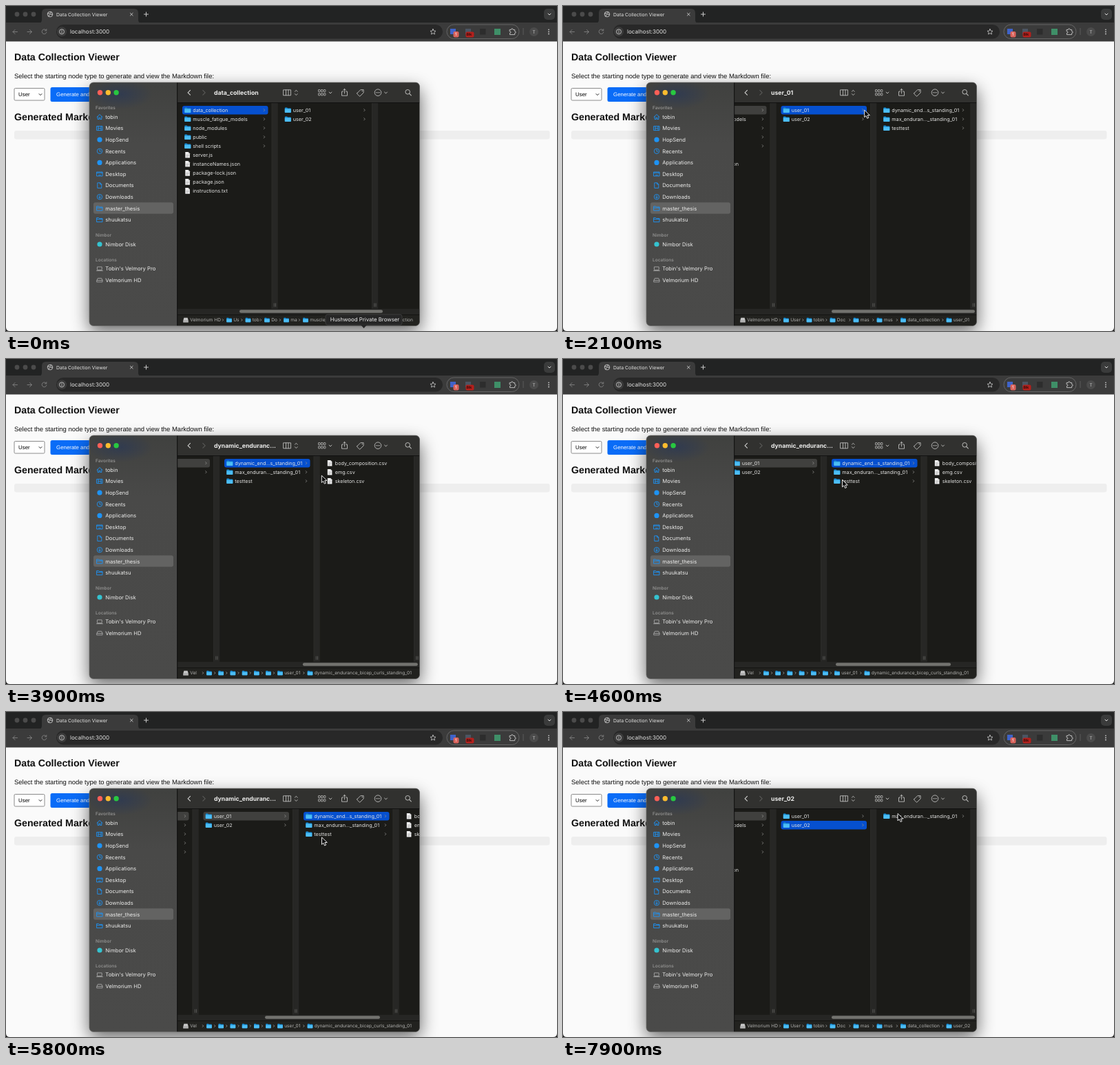
Recreate the animation shown at these times as an HTML page. Size 800 by 472 pixels, loop 8000 ms.

```html
<!DOCTYPE html>
<html lang="en">
<head>
<meta charset="utf-8">
<title>Data Collection Viewer</title>
<style>
html, body { margin: 0; width: 100%; height: 100%; overflow: hidden; background: #161616; }
svg { display: block; width: 800px; height: 472px; }
text { font-family: Inter, "Open Sans", sans-serif; text-rendering: geometricPrecision; white-space: pre; }
.page text { font-family: "Liberation Sans", Arial, sans-serif; }
</style>
</head>
<body>
<svg id="stage" viewBox="0 0 800 472" xmlns="http://www.w3.org/2000/svg"></svg>
<script>
const LOOP = 8000, STEP = 100, PITCH = 145.5;

// Drawing helpers that return SVG markup
const text = (x, mid, size, str, fill = '#e4e4e3', weight = 400) =>
  `<text x="${x}" y="${mid + size * 0.36}" font-size="${size}" fill="${fill}" font-weight="${weight}">${str}</text>`;
const rect = (x, y, w, h, fill, r = 0, more = '') =>
  `<rect x="${x}" y="${y}" width="${w}" height="${h}" rx="${r}" fill="${fill}" ${more}/>`;
const dot = (x, y, r, fill) => `<circle cx="${x}" cy="${y}" r="${r}" fill="${fill}"/>`;
const ring = (x, y, r, color, w = 0.9) =>
  `<circle cx="${x}" cy="${y}" r="${r}" fill="none" stroke="${color}" stroke-width="${w}"/>`;
const line = (d, color, w = 0.9) =>
  `<path d="${d}" fill="none" stroke="${color}" stroke-width="${w}" stroke-linecap="round" stroke-linejoin="round"/>`;
const at = (x, y, body, id = '') => `<g ${id && `id="${id}"`} transform="translate(${x} ${y})">${body}</g>`;
const right = (x, y, color, s = 1.6, w = 0.8) => line(`M${x - s / 2} ${y - s}l${s} ${s}l${-s} ${s}`, color, w);
const down = (x, y, color, s = 2) => line(`M${x - s} ${y - s / 2}l${s} ${s}l${s} ${-s}`, color, 1);

const folder = (x, y, k = 1) => at(x, y, `<g transform="scale(${k})">
  <path d="M-4.5-3q0-.8.8-.8h2.4l1 1h4q.8 0 .8.8v5q0 .8-.8.8h-7.4q-.8 0-.8-.8z" fill="#1a8fd6"/>
  <path d="M-4.5-1.6h9v4.6q0 .8-.8.8h-7.4q-.8 0-.8-.8z" fill="#4cbdf5"/></g>`);
const sheet = (x, y) => at(x, y,
  `<path d="M-3.3-4.3h4.4l2.2 2.2v6.4h-6.6z" fill="#f2f2f2"/><path d="M1.1-4.3v2.2h2.2z" fill="#b5b5b5"/>` +
  line('M-1.8-.4h3.6M-1.8 1.2h3.6M-1.8 2.7h2.4', '#9a9a9a', 0.6));

function browser() {
  const ink = '#c9c9c9', dim = '#7b7b7b';
  let s = rect(0, 0, 800, 30, '#222323') + rect(0, 24, 800, 28, '#3b3b3b');
  s += [16, 28, 40].map(x => dot(x, 12, 3.4, '#4b4b4b')).join('');
  s += `<path d="M47 25q5 0 5-5v-10q0-6 6-6h128q6 0 6 6v10q0 5 5 5z" fill="#3b3b3b"/>`;
  s += ring(64, 12, 3.8, ink) + line('M60.4 10.8h3l1 1.4h3M62 15l1-2.4M65 8.5v2', ink, 1);
  s += text(73, 12, 6.95, 'Data Collection Viewer');
  s += line('M180.4 10.2l3.8 3.8m0-3.8l-3.8 3.8', ink) + line('M200.5 12h6m-3-3v6', ink, 1);
  s += rect(781, 4, 16, 16, '#3a3b3b', 5) + down(789, 12, '#e0e0e0');
  s += line('M16.5 37.5h-6.5m3-3l-3 3l3 3', dim, 1) + line('M31 37.5h6.5m-3-3l3 3l-3 3', dim, 1);
  s += line('M58.4 35.3a3.4 3.4 0 1 0 .5 2.8M58.8 33.6v2.2h-2.2', dim, 1);
  s += rect(73, 27, 561, 20.5, '#282828', 10.2);
  s += dot(81, 37.3, 7, '#3b3b3b') + ring(81, 37.3, 3.5, ink) + line('M81 37v1.8M81 35.5v.1', ink);
  s += text(93, 37.4, 8.1, 'localhost:3000');
  s += line('M620 33.4l1.2 2.6l2.8.3l-2.1 1.9l.6 2.8l-2.5-1.4l-2.5 1.4l.6-2.8l-2.1-1.9l2.8-.3z', ink, 0.8);
  s += rect(640, 27, 105, 20.5, 'none', 10.2, 'stroke="#6a6a6a" stroke-width=".9"');
  s += rect(645, 33, 8, 8, '#3f63c9') + rect(649.5, 37, 8, 8.5, '#d9635c', 2) + text(652.1, 41.3, 6, '1', '#fff');
  s += rect(667, 33, 8, 8, '#4b5563') + rect(667.5, 37.5, 12, 8, '#b3201c', 2) + text(668.6, 41.5, 5.2, 'Blk', '#2a0a0a', 600);
  s += rect(688, 33, 8.5, 8.5, '#2d2d2d') + rect(709, 33, 9, 9, '#3f8f68');
  s += line('M731.5 34.4h2q0-1.6 1.3-1.6t1.3 1.6h2.6v2.4q1.5 0 1.5 1.3t-1.5 1.3v2.2h-7.2v-2.2q1.5 0 1.5-1.3t-1.5-1.3z', ink, 0.9);
  s += rect(750.5, 32, 1, 10, '#5c5c5c') + dot(766.5, 37.5, 6.5, '#4b4b4b') + text(764.6, 37.5, 6.2, 'T', '#d0d0d0');
  return s + [34.3, 37.4, 40.5].map(y => dot(788, y, 0.9, ink)).join('');
}

function page() {
  const h = (y, str) => text(12, y, 14.2, str, '#111', 700);
  return `<g class="page"><path d="M0 51.5h800v415q0 5.5-5.5 5.5h-789q-5.5 0-5.5-5.5z" fill="#fafafa"/>` +
    h(74, 'Data Collection Viewer') +
    text(12, 101.5, 9.47, 'Select the starting node type to generate and view the Markdown file:', '#111') +
    rect(12, 119.5, 44, 17.5, '#fff', 1.5, 'stroke="#6f6f6f" stroke-width=".8"') +
    text(18, 128.5, 7.9, 'User', '#000') + down(50, 128.6, '#222') +
    rect(64.5, 118, 95, 21, '#0a6cf7', 2.5) + text(73, 128.5, 7.9, 'Generate and View', '#fff') +
    h(161, 'Generated Markdown') + rect(12, 181, 777.5, 12.5, '#eeeeee', 3) + '</g>';
}

function sidebar() {
  const blue = '#1e93f5', gray = '#a5a5a5';
  const icon = {
    home: line('M-4 .3l4-3.8l4 3.8M-2.8-.4v3.9h2v-2.4h1.6v2.4h2v-3.9', blue),
    film: line('M-4-3h8v6h-8zM-2-3v6M2-3v6M-2 0h4', blue),
    disc: dot(0, 0, 3.6, blue),
    clock: ring(0, 0, 3.7, blue) + line('M0-2.2v2.4h1.8', blue),
    desk: line('M-4-3h8v6h-8zM-4-1.6h8M-1.5 1.6h3', blue),
    doc: line('M-2.8-3.8h3.4l2.2 2.2v5.4h-5.6zM.6-3.8v2.2h2.2', blue),
    down: ring(0, 0, 3.7, blue) + line('M0-2v3.8m-1.5-1.5l1.5 1.5l1.5-1.5', blue),
    dir: line('M-4-2.8h2.6l1 1h4.4v5h-8zM-4-.6h8', blue),
    cloud: dot(0, 0, 3.6, '#35c3d0'),
    laptop: line('M-3.2-2.6h6.4v4.4h-6.4zM-4.4 3h8.8', gray),
    disk: line('M-4 .4l1.3-3h5.4l1.3 3v2.4h-8zM-4 .4h8', gray)
  };
  const items = [
    [161, 'home', 'tobin'], [177.6, 'film', 'Movies'], [194.2, 'disc', 'HopSend'], [210.8, 'clock', 'Recents'],
    [227.4, 'disc', 'Applications'], [244, 'desk', 'Desktop'], [260.6, 'doc', 'Documents'], [277.2, 'down', 'Downloads'],
    [293.8, 'dir', 'master_thesis'], [310.4, 'dir', 'shuukatsu'], [346, 'cloud', 'Nimbor Disk'],
    [381.5, 'laptop', "Tobin's Velmory Pro"], [398, 'disk', 'Velmorium HD']
  ];
  const heads = [[147.8, 'Favorites'], [332.8, 'Nimbor'], [368.5, 'Locations']];
  return rect(121, 111, 128, 354, 'url(#side)') +
    '<ellipse cx="165" cy="128" rx="48" ry="22" fill="url(#tint)"/>' +
    rect(127, 285.3, 116, 16.5, '#636362', 3) +
    ['#ff5f57', '#febc2e', '#28c840'].map((c, i) => dot(136.5 + i * 11.8, 125.8, 3.7, c)).join('') +
    heads.map(([y, s]) => text(130, y, 6.5, s, '#8f8f8e', 600)).join('') +
    items.map(([y, i, s]) => at(136, y, icon[i]) + text(144.3, y, 7.7, s, '#ededec')).join('') +
    rect(248.2, 111, 1, 354, '#0c0c0c');
}

function toolbar() {
  const ink = '#bdbdbb';
  let s = rect(249, 111, 352, 29.5, '#31312f') + rect(249, 140, 352, 0.8, '#0d0d0c');
  s += line('M267.5 122.4l-3.4 3.4l3.4 3.4', '#d0d0ce', 1.1) + line('M285.8 122.4l3.4 3.4l-3.4 3.4', '#5a5a58', 1.1);
  s += text(302, 125.6, 8.7, '', '#ededec', 700).replace('<text', '<text id="title"');
  s += line('M403 121.8h10.5v8h-10.5zM406.5 121.8v8M410 121.8v8', ink);
  s += line('M419.4 124.2l1.9-1.9l1.9 1.9M419.4 127.6l1.9 1.9l1.9-1.9', ink);
  for (const y of [121.5, 126.7]) for (const x of [453.5, 457.4, 461.3]) s += rect(x, y, 2.6, 3.2, 'none', 0.5, `stroke="${ink}" stroke-width=".8"`);
  s += down(471, 126, ink, 1.9) + line('M489.5 124.2h-2v6h8v-6h-2M491.5 127v-6.6m-1.9 1.8l1.9-1.9l1.9 1.9', ink);
  s += line('M509.8 126.6l5-5h4.3v4.3l-5 5q-.5.4-1 0l-3.3-3.3q-.4-.5 0-1z', ink) + dot(517.3, 123.4, 0.7, ink);
  s += ring(540, 125.7, 4.8, ink) + [537.8, 540, 542.2].map(x => dot(x, 125.7, 0.75, ink)).join('');
  s += down(551.5, 126, ink, 1.9) + ring(583.2, 124.8, 3.3, ink, 1) + line('M585.7 127.3l2.6 2.6', ink, 1.1);
  return s;
}

// Rows with a trailing slash are folders
const lists = {
  root: [0, 'data_collection/', 'muscle_fatigue_models/', 'node_modules/', 'public/', 'shell scripts/', 'server.js',
    'instanceNames.json', 'package-lock.json', 'package.json', 'instructions.txt'],
  users: [1, 'user_01/', 'user_02/'],
  first: [2, 'dynamic_end...s_standing_01/', 'max_enduran..._standing_01/', 'testtest/'],
  second: [2, 'max_enduran..._standing_01/'],
  files: [3, 'body_composition.csv', 'emg.csv', 'skeleton.csv']
};

function column([name, [col, ...rows]]) {
  return at(col * PITCH, 0, rows.map((row, i) => {
    const y = 151.2 + i * 13.02, dir = row.endsWith('/');
    return rect(256, y - 6.3, 124.5, 12.6, 'none', 3, `id="${name}${i}"`) +
      (dir ? folder(263.8, y) + right(375, y, '#8d8d8b') : sheet(263.6, y)) +
      text(271.3, y, 7.2, row.replace('/', ''));
  }).join(''), name);
}

const strips = [0, 1, 2, 3].map(k => at(k * PITCH, 0,
  rect(386, 140.8, 8.8, 299, '#272725') + rect(385.6, 140.8, 0.6, 299, '#333331') +
  line('M389.3 432v4.4M391.5 432v4.4', '#70706e', 0.7))).join('');

const tail = 'dynamic_endurance_bicep_curls_standing_01';
const trails = {
  a: [[261, 'Velmorium HD'], [324, 'Us'], [351.5, 'tob'], [379, 'Do'], [407, 'ma'], [435, 'muscle_fatigue_estimation'], [538, 'data_collection']],
  c: [[261, 'Vel'], ...[0, 1, 2, 3, 4, 5].map(i => [295 + 17.2 * i, '']), [398, 'user_01'], [441.5, tail]]
};
const userTrail = user => [[261, 'Velmorium HD'], [324, 'User'], [357.5, 'tobin'], [391.5, 'Doc'], [425.5, 'mas'],
  [459.5, 'mus'], [494, 'data_collection'], [560.5, user]];
trails.b = userTrail('user_01');
trails.d = userTrail('user_02');
const trail = ([name, parts]) => at(0, 0, parts.map(([x, s], i) =>
  (i ? right(x - 9, 456, '#a0a09e', 1.4) + folder(x, 456, 0.85)
     : `<path d="M257.2 457l1.2-4.2h5.2l1.2 4.2v2.6h-7.6z" fill="#c4c4c4"/>` + line('M257.6 457.4h6.8', '#777', 0.6)) +
  text(x + 6.2, 456, 6.6, s, '#b2b2b0')).join(''), 'trail-' + name);

const stage = document.getElementById('stage');
stage.innerHTML = `<defs>
  <linearGradient id="side" x2="0" y2="1"><stop stop-color="#40413f"/><stop offset=".25" stop-color="#494948"/><stop offset="1" stop-color="#4a4a49"/></linearGradient>
  <radialGradient id="tint"><stop stop-color="#20345e" stop-opacity=".5"/><stop offset="1" stop-color="#20345e" stop-opacity="0"/></radialGradient>
  <filter id="blur" x="-30%" y="-30%" width="160%" height="160%"><feGaussianBlur stdDeviation="13"/></filter>
  <clipPath id="win">${rect(121, 111, 479.5, 353.5, '#000', 6)}</clipPath>
  <clipPath id="view">${rect(249, 140.8, 352, 299.2, '#000')}</clipPath></defs>` +
  browser() + page() +
  rect(121, 121, 480, 352, '#000', 6, 'opacity=".6" filter="url(#blur)"') +
  `<g clip-path="url(#win)">` + rect(249, 111, 352, 354, '#1b1b18') + toolbar() +
  `<g clip-path="url(#view)">` + at(0, 0, strips + Object.entries(lists).map(column).join(''), 'cols') + '</g>' +
  rect(249, 439.8, 352, 8.4, '#262624') + rect(339, 441.2, 208, 4.6, '#73736f', 2.3, 'id="thumb"') +
  rect(249, 448.2, 352, 17, '#22221f') + rect(249, 448, 352, 0.7, '#0f0f0e') +
  Object.entries(trails).map(trail).join('') + sidebar() + '</g>' +
  rect(121, 111, 479.5, 353.5, 'none', 6, 'stroke="#6d6d6c" stroke-width=".7"') +
  at(0, 0, rect(464, 448, 111, 15.3, '#262626', 3, 'stroke="#4c4c4c" stroke-width=".6"') +
    '<path d="M515 463h9l-4.5 5z" fill="#262626"/>' + text(470.8, 455.6, 7.85, 'Hushwood Private Browser', '#f0f0f0'), 'tip') +
  at(0, 0, '<path d="M0 0v10.4l2.4-2.2l1.7 3.8l2-.9l-1.7-3.6h3.4z" fill="#0a0a0a" stroke="#fff" stroke-width=".9" stroke-linejoin="round"/>', 'cursor');

const $ = id => document.getElementById(id);
const show = (id, on) => $(id).style.display = on ? '' : 'none';

const BLUE = '#0650cf', GRAY = '#40403e';
const long = 'dynamic_enduranc...';
// start, title, path, columns, third column, highlighted rows from the left
const states = [
  [0, 'data_collection', 'a', 3, '', 'root0'],
  [1700, 'user_01', 'b', 3, 'first', 'root0 users0'],
  [2700, 'user_01', 'c', 3, 'first', 'root0 users0 first0'],
  [2900, long, 'c', 4, 'first', 'root0 users0 first0'],
  [7200, 'user_02', 'd', 3, 'second', 'root0 users1']
];
const scrollKeys = [[0, 0], [1800, 0], [2100, 85], [2800, 85], [3200, 230], [3900, 230], [4600, 157], [5300, 115],
  [6300, 115], [6700, 50], [7200, 50], [7500, 85]];
const cursorKeys = [[0, 519, 482], [400, 515, 476], [900, 440, 220], [1300, 416, 150], [1800, 416, 150], [2500, 471, 153],
  [3000, 471, 153], [3600, 492, 164], [4100, 440, 172], [4600, 405.5, 175.5], [5300, 458.5, 182], [6300, 458.5, 182],
  [6700, 377.5, 173], [7000, 364, 162], [7300, 364, 162], [7800, 486, 147.5]];

function sample(keys, t) {
  const i = keys.findIndex(k => k[0] > t);
  if (i < 0) return keys[keys.length - 1].slice(1);
  const a = keys[i - 1], b = keys[i], p = (t - a[0]) / (b[0] - a[0]), e = p * p * (3 - 2 * p);
  return a.slice(1).map((v, n) => v + (b[n + 1] - v) * e);
}

let last = -1;
function draw(t) {
  if (t === last) return;
  last = t;
  const [, title, path, count, third, marks] = states.filter(s => s[0] <= t).pop();
  const [scroll] = sample(scrollKeys, t), [x, y] = sample(cursorKeys, t);
  const lit = marks.split(' ');
  $('title').textContent = title;
  for (const name in trails) show('trail-' + name, name === path);
  show('first', third === 'first');
  show('second', third === 'second');
  show('files', count === 4);
  for (const id of ['root0', 'users0', 'users1', 'first0'])
    $(id).setAttribute('fill', !lit.includes(id) ? 'none' : id === lit[lit.length - 1] ? BLUE : GRAY);
  $('cols').setAttribute('transform', `translate(${-scroll} 0)`);
  $('thumb').setAttribute('x', count === 4 ? 345 + (scroll - 50) * 0.477 : 339 + scroll * 0.6);
  $('thumb').setAttribute('width', count === 4 ? 167 : 208);
  $('cursor').setAttribute('transform', `translate(${x} ${y})`);
  show('tip', t < 300);
}

const start = performance.now();
function tick() {
  draw(Math.floor((performance.now() - start) % LOOP / STEP) * STEP);
  requestAnimationFrame(tick);
}
tick();
</script>
</body>
</html>
```
